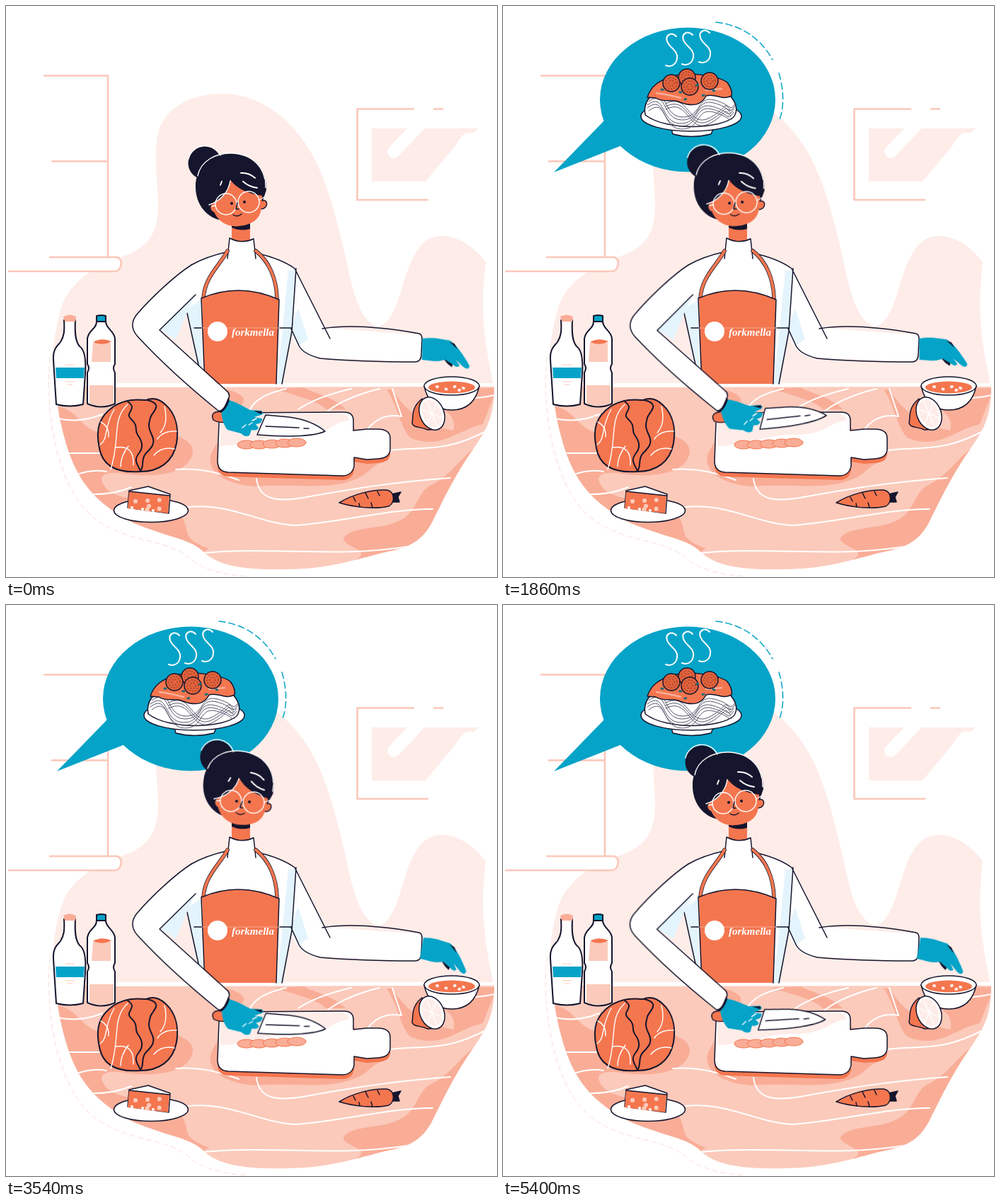
Recreate the animation shown at these times as an HTML page without scripts. Size 694 by 807 pixels, loop 5430 ms.

```html
<!DOCTYPE html>
<html lang="en">
<head>
<meta charset="utf-8">
<title>Kitchen</title>
<style>
/* one clock in ms drives the knife and the resting hand */
@property --t { syntax: "<number>"; inherits: true; initial-value: 0; }
@keyframes clock { to { --t: 5430; } }

html, body { margin: 0; width: 100%; height: 100%; overflow: hidden; background: #fff; }
svg {
  display: block; width: 100vw; height: 100vh;
  animation: clock 5430ms linear infinite;
  --lift: calc((1 - cos(var(--t) * 360deg / 697)) / 2);
  --dip: calc((1 - cos((var(--t) - 880) * 360deg / 478)) / 2);
}
path, ellipse, circle { stroke-linecap: round; stroke-linejoin: round; }
.ink { stroke: #15152d; stroke-width: 1.5; }
.bold { stroke-width: 2; }
.w { fill: #fff; }
.o { fill: #f4764f; }
.n { fill: #15152d; }
.t { fill: #05a3c8; }
.p { fill: #feece8; }
.m { fill: #fbcabb; }
.d { fill: #f9ad97; }
.b { fill: #e4f4fc; }
.no { fill: none; }
.wl { fill: none; stroke: #fff; stroke-width: 2; }
.thin { stroke-width: 1.4; }
.pl { fill: none; stroke: #fbc8ba; stroke-width: 2.6; stroke-linecap: butt; }
.logo { font: italic bold 15px "Liberation Serif", serif; fill: #fff; }

.knife { transform-origin: 310px 562px; transform: rotate(calc(var(--lift) * -11deg)); }
.arm { transform-origin: 265px 375px; transform: rotate(calc(var(--lift) * -.8deg)); }
.hand { transform-origin: 588px 480px; transform: rotate(calc(var(--dip) * 11deg - 4.8deg)); }
.head { transform-origin: 333px 320px; animation: nod 2715ms infinite; }
.bubble { transform-origin: 261px 132px; animation: pop 5430ms ease-in-out infinite; }

@keyframes nod {
  0% { transform: none; animation-timing-function: ease-in-out; }
  26.3%, 47.7% { transform: rotate(9.5deg); animation-timing-function: cubic-bezier(.25, .2, .2, 1); }
  89.5%, 100% { transform: none; }
}
@keyframes pop {
  0%, 16.7% { transform: scale(0); animation-timing-function: ease-out; }
  20.3% { transform: scale(1.12, 1.05); }
  24.5% { transform: scale(.97); }
  30%, 100% { transform: none; }
}
</style>
</head>
<body>
<svg viewBox="0 0 694 807" preserveAspectRatio="none">
<defs>
  <path id="slab" d="M70 538H690C690 570 685 590 666 618C636 660 622 690 602 730C588 756 570 765 540 771C500 780 460 796 400 796C350 797 307 795 282 774C266 757 246 754 217 744C190 735 170 728 152 714C112 686 98 658 86 622Q73 580 70 538Z"/>
  <clipPath id="top"><use href="#slab"/></clipPath>
  <path id="steam" d="M15 4C8-3-1 2 2 11C5 20 18 24 16 35C15 44 7 48 0 45"/>
  <ellipse id="slice" rx="13" ry="6" fill="#f9ad97" stroke="#f4764f"/>
  <g id="ball">
    <circle class="ink" r="12" fill="#e0623c"/>
    <g fill="none" stroke="#8f3423" stroke-width="1.300" stroke-dasharray=".5 3.500"><circle r="8"/><circle r="4"/></g>
  </g>
  <g id="lens"><circle class="wl thin" r="15"/></g>
</defs>

<!-- wall -->
<path class="p" d="M70 540C62 500 68 462 77 430C88 390 125 368 165 354C200 342 214 323 215 285C215 250 208 210 215 180C224 143 263 123 308 124C351 125 392 150 420 190C451 232 466 297 479 350C489 400 500 446 525 453C546 451 555 413 564 385C575 350 588 325 616 325C643 325 665 345 678 362C670 430 675 470 690 540Z"/>
<path class="no" stroke="#fdddd5" stroke-dasharray="7 5" d="M62 497C56 560 66 670 120 720C170 762 230 750 263 784Q290 803 342 806"/>
<path class="w" d="M61 355H157Q165 358 162 368Q160 375 153 375H3L61 369Z"/>
<path class="pl" d="M53 98.500H144V354M64 219.500H144M61 355H157Q165 358 162 368Q160 375 153 375H3"/>
<path class="pl" d="M577 145.500H496.500V274H597M604 145.500H618"/>
<path class="p" d="M517 173H669C661 176 667 180 655 179C645 178 641 190 633 200L593 248H517Z"/>
<path class="no" stroke="#fff" stroke-width="18" d="M548 206L590 162"/>

<!-- worktop -->
<use href="#slab" class="m"/>
<g clip-path="url(#top)">
  <path class="d" d="M70 565C102 570 103 595 132 603C185 595 265 600 264 630C261 660 213 669 160 660C135 658 128 667 143 683C169 706 220 690 244 716C266 744 241 749 287 767L230 800L60 740Z"/>
  <path class="d" d="M291 630C280 655 307 676 351 679C410 675 452 684 488 671C518 661 511 650 540 642V620L480 590L308 600ZM538 542C555 567 558 600 573 611C617 627 636 600 674 591L694 540Z"/>
  <path class="d" d="M694 610C650 619 638 660 599 678C579 690 582 718 552 729C528 740 489 735 477 752C475 765 520 768 494 783L600 780ZM308 541C344 549 344 563 318 571L303 563ZM380 541C408 550 444 559 452 570H480C464 552 425 544 421 539Z"/>
  <path class="m" d="M545 541H670Q632 552 596 560Q640 575 632 600Q575 590 545 541Z"/>
  <path class="wl" d="M73 583Q105 590 136 577M83 632H134M96 664Q120 654 142 658M110 690Q150 692 177 680M240 655Q285 652 329 670M354 668C358 701 388 700 420 695C480 684 543 673 628 667M240 711C311 696 351 731 409 734C466 731 546 710 603 711M280 773C380 764 470 780 567 764M345 570Q355 550 396 541M413 570Q440 552 488 541M455 572Q482 552 528 541M512 597Q530 575 559 580L546 541M542 628C592 622 620 632 680 600M638 554Q665 556 690 550"/>
</g>
<path class="w" d="M130 533H690V538L130 539Z"/>

<!-- bottles -->
<g class="ink bold">
  <path class="w" d="M82 444H98C97 462 98 474 104 481C113 487 113 505 112 520L109 563Q90 568 71 563L67 500C66 484 73 480 77 475C82 467 83 460 82 444Z"/>
  <path class="w" d="M128 446H141C141 456 153 459 154 470V506Q150 512 154 518V562Q135 571 115 562V518Q119 512 115 506V470C117 457 128 457 128 446Z"/>
  <path class="t" d="M128 438Q135 436 141 438V446H128Z"/>
</g>
<path class="d" d="M81 439Q90 434 99 439L98 446H83Z"/>
<path class="t" d="M70 511H111L110 526H71Z"/>
<path class="no" stroke="#fbcabb" d="M84 507H97M84 531H97M87 535H94"/>
<path class="m" d="M123 476H148V503H121ZM118 536H152V562Q134 568 118 562Z"/>
<path class="o" d="M123 475Q135 468 149 474Q137 481 123 475Z"/>

<!-- cabbage -->
<path class="o ink bold" d="M152 566C170 555 185 556 198 557Q212 551 225 563C242 578 244 600 241 618C236 645 216 658 190 658C162 660 137 653 132 625C126 597 132 580 152 566Z"/>
<path class="wl thin" d="M153 570C138 595 145 612 133 620M172 563C149 584 162 612 148 655M134 588Q146 594 145 609M155 624Q182 620 180 649M173 622Q162 636 162 651M241 601Q222 600 214 612M238 626Q220 622 209 635M218 603Q230 590 224 566"/>
<path class="no ink bold" d="M172 559C188 570 166 574 177 584S181 599 186 606S196 622 188 632S185 646 190 657M200 557C224 563 206 574 204 582S200 594 206 606S206 624 198 632S196 650 190 657"/>

<!-- cheese -->
<ellipse class="w ink" cx="205" cy="713" rx="52.500" ry="16.500"/>
<path class="w ink" d="M174 685L201 679L232 690L230 717L172 709Z"/>
<path class="o" d="M174 686L231 692L229 717L172 710Z"/>
<path class="no ink" d="M174 686L231 692"/>
<path class="no" stroke="#fbcabb" stroke-width="6" stroke-dasharray=".1 17" d="M183 700L217 698L193 712L226 710"/>
<path class="no" stroke="#fff" stroke-width="4" stroke-dasharray=".1 15" d="M178 709L208 713"/>

<!-- carrot -->
<path class="n ink" d="M545 690L558 687L554 694L556 701H545Z"/>
<path class="o ink" d="M471 702C490 690 518 683 538 684C550 686 550 703 541 707C520 712 490 708 471 702Z"/>
<path class="no ink" d="M491 694l3 6M508 688l4 8M525 686l3 6M500 708l-1-5M518 709l-2-7"/>

<!-- bowl and lemon -->
<path class="w ink" d="M591 537C596 560 610 571 630 571S664 560 669 537"/>
<ellipse class="w ink" cx="630" cy="537" rx="39" ry="13"/>
<ellipse class="o" cx="630" cy="539" rx="33" ry="8.500"/>
<path class="no" stroke="#feece8" stroke-width="4" stroke-dasharray="1 12" d="M609 538L624 542L637 537L650 541L630 545"/>
<path class="o ink" d="M588 555C572 568 576 580 574 590C577 597 586 594 596 599L612 598Z"/>
<g transform="translate(602 576) rotate(-22)">
  <ellipse class="w ink" rx="17" ry="24"/>
  <ellipse class="p" rx="13" ry="20"/>
  <path class="wl thin" d="M0-18V18M-11-11L11 11M-11 11L11-11"/>
</g>

<!-- board -->
<path id="plank" class="o" transform="translate(0 6)" d="M315 575L478 574Q491 574 491 586V600L510 598H525Q543 598 543 611V626Q543 639 525 640L510 641L492 638V650Q490 663 476 664L314 659Q299 658 299 643L301 590Q302 576 315 575Z"/>
<use href="#plank" y="0" transform="translate(0 -6)" style="fill:#fff"/>
<path class="w ink" d="M315 575L478 574Q491 574 491 586V600L510 598H525Q543 598 543 611V626Q543 639 525 640L510 641L492 638V650Q490 663 476 664L314 659Q299 658 299 643L301 590Q302 576 315 575Z"/>
<path class="p" d="M315 577L470 576Q487 577 484 586C461 588 459 605 415 606C379 604 347 621 303 622V590Q304 578 315 577Z"/>
<use href="#slice" x="340" y="620"/><use href="#slice" x="358" y="620"/><use href="#slice" x="376" y="619"/><use href="#slice" x="394" y="618"/><use href="#slice" x="411" y="617"/>

<!-- thought -->
<g class="bubble">
  <path class="t" d="M143 162L72 235L168 197Z"/>
  <ellipse class="t" cx="261" cy="132.500" rx="124" ry="102"/>
  <path class="no" stroke="#05a3c8" stroke-width="1.500" stroke-dasharray="9 5" d="M301 23C340 27 366 49 381 76M390 95C397 119 398 143 390 163"/>
  <g class="wl"><use href="#steam" x="230" y="39"/><use href="#steam" x="253" y="37"/><use href="#steam" x="277" y="34"/></g>
  <path class="w ink" d="M238 174L240 181Q266 188 294 181L297 174Z"/>
  <ellipse class="w ink" cx="266" cy="156" rx="71" ry="21"/>
  <path class="w ink" d="M201 154C197 133 213 121 230 114H300C324 122 336 143 326 157C308 173 233 178 201 154Z"/>
  <g class="no" stroke="#55556a">
    <path id="curl" d="M204 140C230 120 222 165 250 166S270 135 296 142S316 160 326 146"/>
    <use href="#curl" y="4"/><use href="#curl" y="8" x="2"/><use href="#curl" y="-5" x="2"/><use href="#curl" y="-9" x="3"/>
    <path id="loop" d="M230 142C262 125 262 176 290 163S310 136 322 152"/>
    <use href="#loop" y="4"/><use href="#loop" y="-4"/>
  </g>
  <path class="o ink" d="M204 129C209 113 220 106 237 100C264 91 306 100 317 108Q325 119 323 127C309 134 301 123 287 127C280 141 266 142 250 136C240 131 226 137 216 130Z"/>
  <path class="no" stroke="#f9ad97" stroke-width="2.500" d="M217 123Q237 126 251 130M287 119L309 117"/>
  <use href="#ball" x="260" y="101"/><use href="#ball" x="238" y="109"/><use href="#ball" x="292" y="106"/><use href="#ball" x="264" y="114"/>
  <path class="no" stroke="#176b78" stroke-width="3" stroke-dasharray="2 24" d="M224 118L252 122L278 110L303 122L257 132"/>
</g>

<!-- coat -->
<path class="w" d="M316 328L314 347C293 353 274 357 262 366L256 435L278 534H390L403 465Q415 495 440 497L583 503Q589 490 588 465L450 455L409 371C393 360 375 354 353 349L350 329Z"/>
<path class="b" d="M256 428L275 416L278 534L267 490ZM399 374L409 373L403 465L390 534H383ZM403 454L413 427L427 471L414 480Z"/>
<path class="no ink" d="M353 349C375 354 393 360 408 371L458 470M447 456C490 449 550 457 584 463Q588 464 588 471L587 492Q587 503 578 503C540 503 490 502 444 498Q420 492 414 480L403 456M410 371L404 460L390 534M256 434L278 534M266 455H277M387 455H404"/>
<path class="o" d="M319 298H345V330Q332 337 319 330Z"/>
<path class="n" d="M319 307L345 306V315Q331 319 319 313Z"/>
<path class="w" d="M316 328Q333 337 350 329L353 354H314Z"/>
<path class="no ink" d="M313 357L316 328Q333 337 350 329L353 357M315 347Q283 354 262 366"/>
<g class="no">
  <path id="strap" class="ink" style="stroke-width:5.500" d="M313 346C303 366 281 382 279 413M353 346C372 361 382 385 383 412"/>
  <path stroke="#f4764f" stroke-width="4" d="M313 346C303 366 281 382 279 413M353 346C372 361 382 385 383 412"/>
</g>
<path class="o" d="M277 413Q330 390 386 415L382 534H281Z"/>
<path class="no ink" d="M281 534L276 413Q330 390 386 415L382 534"/>
<path class="no" stroke="#f9a58c" d="M277 455H386"/>
<circle class="w" cx="299" cy="460" r="14"/>
<text class="logo" x="319" y="466">forkmella</text>

<!-- head -->
<g class="head">
  <circle class="n" cx="281" cy="222" r="23.500"/>
  <path class="n" d="M268 256C267 228 290 208 318 208C350 208 369 230 368 260L360 284L307 303C284 301 268 280 268 256Z"/>
  <path class="wl thin" d="M258 216A24 24 0 0 1 303 211M271 240C275 219 297 207 320 208C350 210 367 229 367 257"/>
  <path class="o ink" d="M360 276C371 270 372 287 360 287ZM295 281C285 276 287 295 298 292Z"/>
  <path class="o" d="M317 246C315 262 303 274 291 280L295 293C302 307 316 313 330 311C350 309 361 299 361 283L362 268C345 266 327 259 317 246Z"/>
  <path class="n" d="M316 240C329 261 348 266 364 264L366 246L338 224Z"/>
  <path class="wl" d="M332 236Q343 235 352 243M335 248Q344 256 355 257M305 248l-2 5"/>
  <path class="wl thin" d="M317 247C315 262 303 276 287 281M326 280l2-2M358 274l7-4M296 282l-5 1"/>
  <use href="#lens" x="311" y="280"/><use href="#lens" x="343" y="277"/>
  <circle class="n" cx="319" cy="279" r="2"/><circle class="n" cx="337" cy="277" r="2"/>
  <path class="no ink" d="M327 278L325 287H329M321 295Q327 299 333 294"/>
</g>

<!-- cutting arm -->
<g class="arm">
  <g class="knife">
    <path class="o ink" d="M308 572L296 574Q289 577 293 585Q300 590 317 588Z"/>
    <path class="w ink" d="M367 578L400 581C423 584 439 591 451 601C434 609 395 609 355 606Z"/>
    <path class="no ink" d="M367 594L414 596M421 597H428"/>
    <path class="t" d="M310 556C326 559 337 567 345 571L361 572Q367 577 357 579L351 581L362 583Q363 590 353 591L357 596Q355 601 347 599L344 607Q338 610 332 604L313 599C306 591 304 577 304 565Z"/>
    <path class="wl thin" d="M334 596l5-4M343 592l5-3M348 586l6-3"/>
    <path class="n" d="M350 572l12 1l-1 4z"/>
  </g>
  <path class="w" d="M262 366C240 380 205 412 184 437C176 448 178 458 186 467C221 505 263 542 300 572Q307 576 311 565L316 549L217 458L268 408Z"/>
  <path class="b" d="M217 457L267 409L256 433L240 472Z"/>
  <path class="no ink" d="M262 366C240 380 205 412 184 437C176 448 178 458 186 467C221 505 263 542 300 572Q305 575 309 567L315 554Q317 548 312 544L217 458L268 408"/>
  <path class="n" d="M300 572Q309 571 314 553L316 557Q311 572 303 575Z"/>
</g>

<!-- resting hand -->
<g class="hand">
  <path class="n" d="M617 499L632 504L629 512L623 507Z"/>
  <path class="t" d="M589 470C604 468 616 472 627 474C637 480 646 496 654 511Q653 518 646 513L635 502L640 510Q637 515 630 508L620 501C608 505 597 501 587 500Z"/>
  <path class="n" d="M627 476L634 479L638 487Z"/>
</g>
</svg>
</body>
</html>
```
